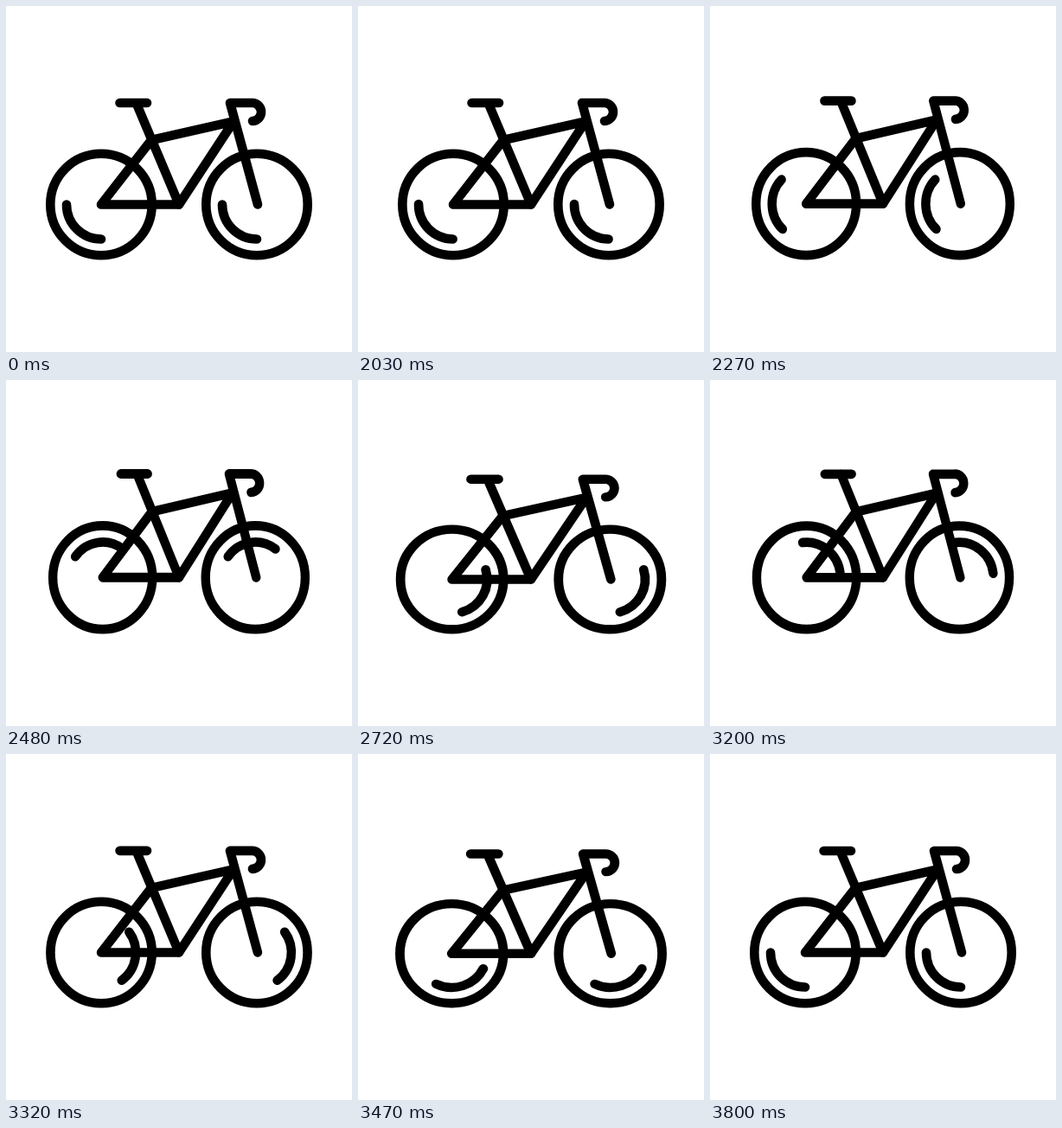
Write an HTML page that moves like this. It is 400 px wide and 400 px high and loops after 3.89 s.

```html
<!DOCTYPE html>
<html lang="en">
<head>
<meta charset="utf-8">
<title>Bicycle</title>
<style>
  html, body { margin: 0; width: 100%; height: 100%; overflow: hidden; background: #fff; }
  svg { display: block; width: 100vw; height: 100vh; }
</style>
</head>
<body>
<svg viewBox="0 0 400 400">
  <g id="bike" fill="none" stroke="#000" stroke-width="10.6" stroke-linecap="round" stroke-linejoin="round">
    <path d="M131.5 112H163M150.5 112L200 229.5"/>
    <path d="M110 229.5L168 155L263 133.5L200 229.5Z"/>
    <path d="M291 229.5L259 112H284A10.5 10.5 0 0 1 285 133"/>
    <circle cx="110" cy="229.5" r="58.7"/>
    <circle cx="290" cy="229.5" r="58.7"/>
    <path class="shine" data-x="110" d="M-40 0A40 40 0 0 0 0 40"/>
    <path class="shine" data-x="290" d="M-40 0A40 40 0 0 0 0 40"/>
  </g>
</svg>
<script>
  const LOOP = 3890, START = 2000, RIDE = 1800, STEP = 30;
  const TURN = 720, STRETCH = 0.02, GROUND = 293.5;
  // [ms into the ride, amount]: 1 is tall and narrow, -1 is low and wide
  const bounce = [[0, 0], [450, 1], [800, -1], [1150, 1], [1500, -1], [1800, 0]];

  const bike = document.getElementById('bike');
  const shines = document.querySelectorAll('.shine');
  const ease = u => u * u * (3 - 2 * u);

  function sample(keys, t) {
    const i = Math.max(1, keys.findIndex(k => k[0] >= t));
    const [t0, a] = keys[i - 1], [t1, b] = keys[i];
    return a + (b - a) * ease((t - t0) / (t1 - t0));
  }

  function draw(ms) {
    const elapsed = Math.floor((ms % LOOP - START) / STEP) * STEP;
    const t = Math.min(RIDE, Math.max(0, elapsed));
    const s = STRETCH * sample(bounce, t);
    const angle = TURN * ease(t / RIDE);
    bike.setAttribute('transform',
      `translate(200 ${GROUND}) scale(${1 - s} ${1 + s}) translate(-200 ${-GROUND})`);
    for (const p of shines)
      p.setAttribute('transform', `translate(${p.dataset.x} 229.5) rotate(${angle})`);
  }

  const begin = performance.now();
  function tick() {
    draw(performance.now() - begin);
    requestAnimationFrame(tick);
  }
  tick();
</script>
</body>
</html>
```
